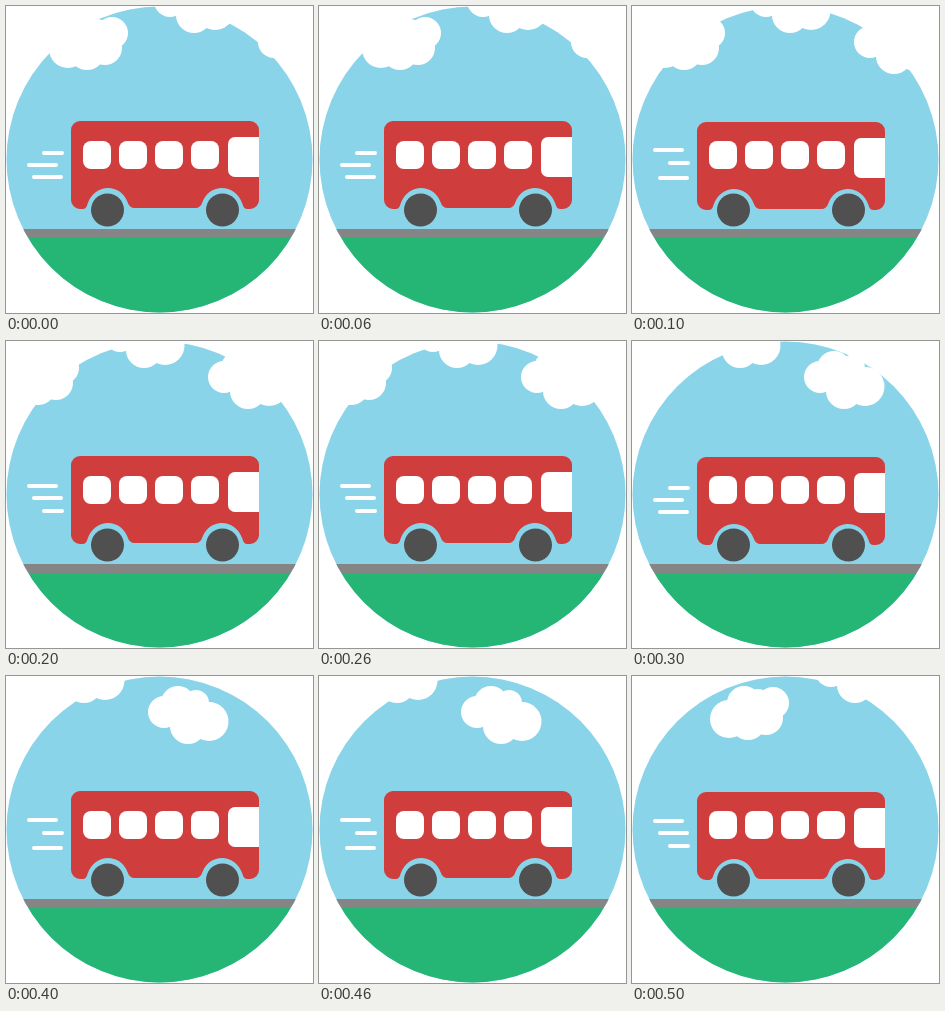
An HTML page with a canvas for the animation above (600 ms loop, 307 px wide and 307 px high).

```html
<!DOCTYPE html>
<html lang="en">
<head>
<meta charset="utf-8">
<title>Bus ride</title>
<style>
  html, body { margin: 0; width: 100%; height: 100%; overflow: hidden; background: #fff; }
  canvas { display: block; width: 307px; height: 307px; }
</style>
</head>
<body>
<canvas id="stage"></canvas>
<script>
const SIZE = 307, STEP = 100, STEPS = 6;
const SKY = '#8ad4e9', RED = '#cf3d3d', WHITE = '#fff';
const WHEELS = [101.5, 216.5], AXLE = 204.5;

const canvas = document.getElementById('stage');
const ratio = window.devicePixelRatio || 1;
canvas.width = canvas.height = Math.round(SIZE * ratio);
const ctx = canvas.getContext('2d');
ctx.scale(ratio, ratio);

// Cloud puffs as [x, y, radius] around the lowest puff
const PUFFS = [[0, 0, 18], [-24, -14, 16], [-10, -23, 17], [8, -23, 13], [21, -4.5, 19.5], [0, -12, 16]];
const BACK_PUFFS = [[0, 0, 18], [-19, -3, 19], [-4, -19, 17], [10, -20, 13], [25, -19, 16], [18, -4, 17]];

// Cloud positions per step; null while hidden
const CLOUDS = [
  { puffs: PUFFS, y: 50, x: [292, 262, 242, 212, 182, null] },
  { puffs: PUFFS, y: 9, x: [188, 158, 138, 108, 78, 223] },
  { puffs: BACK_PUFFS, y: 46, x: [81, 52, 32, null, null, 116] }
];

// Speed lines as [x1, x2, y], cycling through three poses
const LINES = [
  [[38, 56, 147], [23, 50, 159], [28, 55, 171]],
  [[23, 50, 144], [38, 56, 157], [28, 55, 172]],
  [[23, 50, 145], [28, 55, 157], [38, 56, 170]]
];

function disc(x, y, r, color) {
  ctx.fillStyle = color;
  ctx.beginPath();
  ctx.arc(x, y, r, 0, Math.PI * 2);
  ctx.fill();
}

function box(x, y, w, h, color, radii = 0) {
  ctx.fillStyle = color;
  ctx.beginPath();
  ctx.roundRect(x, y, w, h, radii);
  ctx.fill();
}

function scene() {
  ctx.save();
  ctx.beginPath();
  ctx.arc(153.5, 153.5, 153, 0, Math.PI * 2);
  ctx.clip();
  box(0, 0, SIZE, SIZE, SKY);
  box(0, 223, SIZE, 9, '#858585');
  box(0, 232, SIZE, 75, '#25b574');
  ctx.restore();
}

function body(bob) {
  const top = 115 + bob, low = 203 + bob, mid = 202 + bob;
  const [rear, front] = WHEELS;
  ctx.fillStyle = RED;
  ctx.beginPath();
  ctx.moveTo(74, top);
  ctx.arcTo(253, top, 253, low, 9);
  ctx.arcTo(253, low, front + 20, low, 9);
  ctx.lineTo(front + 25, low);
  ctx.quadraticCurveTo(front + 21, low, front + 20, low - 5);
  ctx.bezierCurveTo(front + 13, top + 62, front - 13, top + 62, front - 20, low - 7);
  ctx.quadraticCurveTo(front - 22, mid, front - 27, mid);
  ctx.lineTo(rear + 27, mid);
  ctx.quadraticCurveTo(rear + 22, mid, rear + 20, low - 7);
  ctx.bezierCurveTo(rear + 13, top + 62, rear - 13, top + 62, rear - 20, low - 5);
  ctx.quadraticCurveTo(rear - 21, low, rear - 25, low);
  ctx.arcTo(65, low, 65, top, 9);
  ctx.arcTo(65, top, 74, top, 9);
  ctx.fill();
}

function bus(bob) {
  body(bob);
  for (let i = 0; i < 4; i++) box(77 + 36 * i, 135, 28, 28, WHITE, 8);
  box(222, 131 + bob, 31, 40, WHITE, [7, 0, 0, 7]);
  for (const x of WHEELS) disc(x, AXLE - 0.5, 16.5, '#505050');
}

function speedLines(step) {
  ctx.strokeStyle = WHITE;
  ctx.lineWidth = 4;
  ctx.lineCap = 'round';
  ctx.beginPath();
  for (const [x1, x2, y] of LINES[step % LINES.length]) {
    ctx.moveTo(x1, y);
    ctx.lineTo(x2, y);
  }
  ctx.stroke();
}

function draw(step) {
  ctx.fillStyle = WHITE;
  ctx.fillRect(0, 0, SIZE, SIZE);
  scene();
  for (const { puffs, x, y } of CLOUDS) {
    if (x[step] === null) continue;
    for (const [dx, dy, r] of puffs) disc(x[step] + dx, y + dy, r, WHITE);
  }
  speedLines(step);
  bus(step % 2);
}

let start = null;
function tick(now) {
  start ??= now;
  draw(Math.floor((now - start) / STEP) % STEPS);
  requestAnimationFrame(tick);
}
draw(0);
requestAnimationFrame(tick);
</script>
</body>
</html>
```
